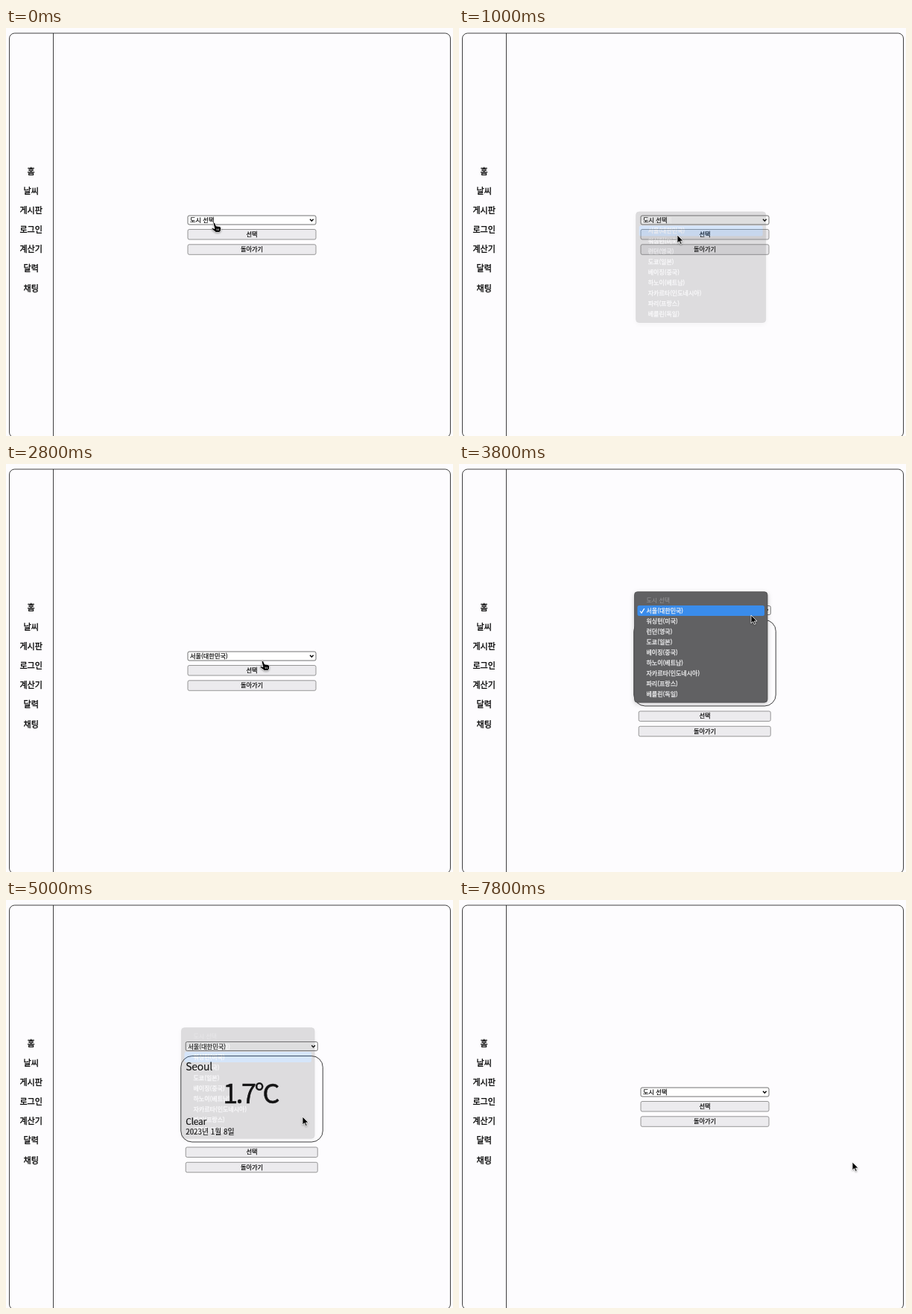
These frames come from a looping animation (600x548 px, 7900 ms). An HTML page:

```html
<!DOCTYPE html>
<html lang="ko">
<head>
<meta charset="utf-8">
<title>날씨</title>
<style>
  html, body { margin: 0; width: 100%; height: 100%; overflow: hidden; background: #fdfcfe; }
  svg { display: block; width: 600px; height: 548px; }
  text {
    font-family: 'Noto Sans CJK KR', 'Noto Sans CJK JP', 'Noto Sans CJK', sans-serif;
    fill: #000; stroke: #000; stroke-width: .2;
  }
  .mid { text-anchor: middle; }
  .side { stroke-width: .3; }
  .line { fill: none; stroke: #000; stroke-width: .75; }
  .select { fill: #fff; stroke: #444; stroke-width: .75; }
  .button { fill: #ecebee; stroke: #777; stroke-width: .75; }
  .chevron { fill: none; stroke: #000; stroke-width: 1.4; }
  .menu text { fill: #f4f4f5; stroke: #f4f4f5; stroke-width: .25; }
  .menu .off { fill: #97979a; stroke: none; }
  .panel { fill: #616163; stroke: #49494b; stroke-width: .8; filter: drop-shadow(0 2px 3px #0003); }
  .bar { fill: #3a8ceb; }
  .tick { fill: none; stroke: #fff; stroke-width: 1.2; }
  .temp { letter-spacing: -.07em; stroke-width: .5; }
  .name { letter-spacing: -.02em; }
  #cursor { filter: drop-shadow(0 1px 1px #0005); }
  #cursor path { stroke: #fff; stroke-width: .8; stroke-linejoin: round; }
</style>
</head>
<body>
<svg id="stage" viewBox="0 0 600 548"></svg>
<script>
const LOOP = 7900, STEP = 100, ROW = 14, CENTER = 330;
const cities = ['도시 선택', '서울(대한민국)', '워싱턴(미국)', '런던(영국)', '도쿄(일본)', '베이징(중국)',
  '하노이(베트남)', '자카르타(인도네시아)', '파리(프랑스)', '베를린(독일)'];
const sections = ['홈', '날씨', '게시판', '로그인', '계산기', '달력', '채팅'];

// Text placed by the vertical centre of its glyphs
const label = (x, cy, size, str, cls = '') =>
  `<text class="${cls}" x="${x}" y="${cy + size * .37}" font-size="${size}">${str}</text>`;

const box = (cls, x, y, w, h, r) =>
  `<rect class="${cls}" x="${x}" y="${y}" width="${w}" height="${h}" rx="${r}"/>`;

const select = (x, y, w, value) =>
  box('select', x, y, w, 12, 2) + label(x + 3, y + 6, 8.2, value) +
  `<path class="chevron" d="M${x + w - 8} ${y + 4.8}l2.3 2.5 2.3-2.5"/>`;

const buttons = (x, y, w) => ['선택', '돌아가기'].map((str, i) =>
  box('button', x, y + i * 20.3, w, 13.5, 2) +
  label(CENTER, y + i * 20.3 + 6.2, 8.2, str, 'mid')).join('');

const picker = city => select(244, 252, 172, city) + buttons(244, 270.5, 172);

function report(value, width, city, temp, sky) {
  const left = CENTER - width / 2, x = left + 6.5, inner = width - 13.5;
  return select(x, 190.5, inner, value) + box('line', left, 209.5, width, 115.5, 15) +
    label(x, 224, 14, city, 'name') + label(CENTER - 2, 260, 36, temp, 'mid temp') +
    label(x, 297.5, 12, sky, 'name') + label(x, 311, 9.8, '2023년 1월 8일') +
    buttons(x, 332, inner);
}

const pages = [
  { from: 0, html: picker(cities[0]) },
  { from: 1200, html: picker(cities[1]) },
  { from: 2900, card: true, html: report(cities[1], 190.5, 'Seoul', '1.7°C', 'Clear') },
  { from: 5300, card: true, html: report(cities[2], 190.5, 'Seoul', '1.7°C', 'Clear') },
  { from: 6600, card: true, html: report(cities[2], 216, 'Washington', '3.46°C', 'Clouds') },
  { from: 7700, html: picker(cities[0]) }
];

const menus = [
  { opens: 100, picks: 800, x: 237.7, y: 247, w: 174, checked: 0 },
  { opens: 3400, picks: 4800, x: 235.5, y: 171.7, w: 178.5, checked: 1 }
];

function menuHtml({ x, y, w, checked }) {
  const rowY = i => y + 11.3 + i * ROW;
  return `<g class="menu">${box('panel', x, y, w, 148.5, 4)}${box('bar', x + 4, y + 4.4, w - 8, ROW, 2.5)}
    <path class="tick" d="M${x + 7.5} ${rowY(checked) + .5}l2 2.6 3.8-6"/>
    ${cities.map((c, i) => label(x + 16, rowY(i), 8, c, i ? '' : 'off')).join('')}</g>`;
}

// Places the pointer comes to rest, with arrival times
const stops = [
  { at: 0, x: 279, y: 262 }, { at: 700, x: 293, y: 278 }, { at: 1700, x: 318, y: 306 },
  { at: 2800, x: 344, y: 265 }, { at: 3200, x: 390, y: 194 }, { at: 4000, x: 394, y: 212 },
  { at: 4300, x: 395, y: 221 }, { at: 4500, x: 396, y: 213 }, { at: 5000, x: 398, y: 291 },
  { at: 5700, x: 410, y: 336 }, { at: 6200, x: 418, y: 336 }, { at: 6500, x: 446, y: 336 },
  { at: 7300, x: 424, y: 358 }, { at: 7800, x: 528, y: 352 }
];

// Rests for half of each interval, then eases to the next stop
function pointer(t) {
  const next = stops.findIndex(s => s.at > t);
  if (next < 0) return stops[stops.length - 1];
  const a = stops[next - 1], b = stops[next];
  const u = Math.max(0, 1 - 2 * (b.at - t) / (b.at - a.at));
  const k = u * u * (3 - 2 * u);
  return { x: a.x + (b.x - a.x) * k, y: a.y + (b.y - a.y) * k };
}

document.getElementById('stage').innerHTML =
  box('line', 4.5, 7, 592, 543, 7) + '<path class="line" d="M63.5 7V548"/>' +
  sections.map((s, i) => label(33.7, 192.5 + i * 26.15, 11.1, s, 'mid side')).join('') +
  pages.map(p => `<g class="page">${p.html}</g>`).join('') + menus.map(menuHtml).join('') +
  `<g id="cursor">
    <path id="arrow" d="M0 0V11L2.6 8.6 4.4 12.5 6.2 11.7 4.4 8H8Z"/>
    <g id="hand">
      <path d="M-.8.6C-.6-.8 1-.8 1.6.4L3.2 4 8 4.6 9.6 6.4 9.4 10 7.4 12.4H2.8L-2.6 8.2C-3.4 7-2.4 6.4-1.2 6.8L.9 7.6Z"/>
      <path fill="none" d="M4 7.5l.5 2.5M6.2 7.5l.3 2.5"/>
    </g>
  </g>`;

const all = s => [...document.querySelectorAll(s)];
const [cursor] = all('#cursor'), [arrow] = all('#arrow'), [hand] = all('#hand');
const pageEls = all('.page'), menuEls = all('.menu'), bars = all('.bar');
const show = (el, on) => { el.style.display = on ? '' : 'none'; };

function drawMenu(menu, i, t) {
  const alpha = t < menu.opens ? 0 : Math.min(1, Math.max(0, 1 - .4 * (t - menu.picks) / STEP));
  const lastHover = menu.picks - STEP;
  const row = Math.floor((pointer(Math.min(t, lastHover)).y - menu.y - 4.4) / ROW);
  menuEls[i].style.opacity = alpha;
  bars[i].style.transform = `translateY(${row * ROW}px)`;
  show(bars[i], row > 0 && t !== lastHover);
  return alpha > 0;
}

function draw(t) {
  const current = pages.filter(p => p.from <= t).pop();
  pages.forEach((p, i) => show(pageEls[i], p === current));
  const menuOpen = menus.map((m, i) => drawMenu(m, i, t)).some(Boolean);

  const { x, y } = pointer(t);
  const onCard = current.card && y > 205 && y < 330;
  const pointing = !menuOpen && !onCard && Math.abs(x - CENTER) < 95;
  cursor.style.transform = `translate(${x}px, ${y}px)`;
  show(hand, pointing);
  show(arrow, !pointing);
}

const start = performance.now();
function tick() {
  draw(Math.floor((performance.now() - start) % LOOP / STEP) * STEP);
  requestAnimationFrame(tick);
}
tick();
</script>
</body>
</html>
```
